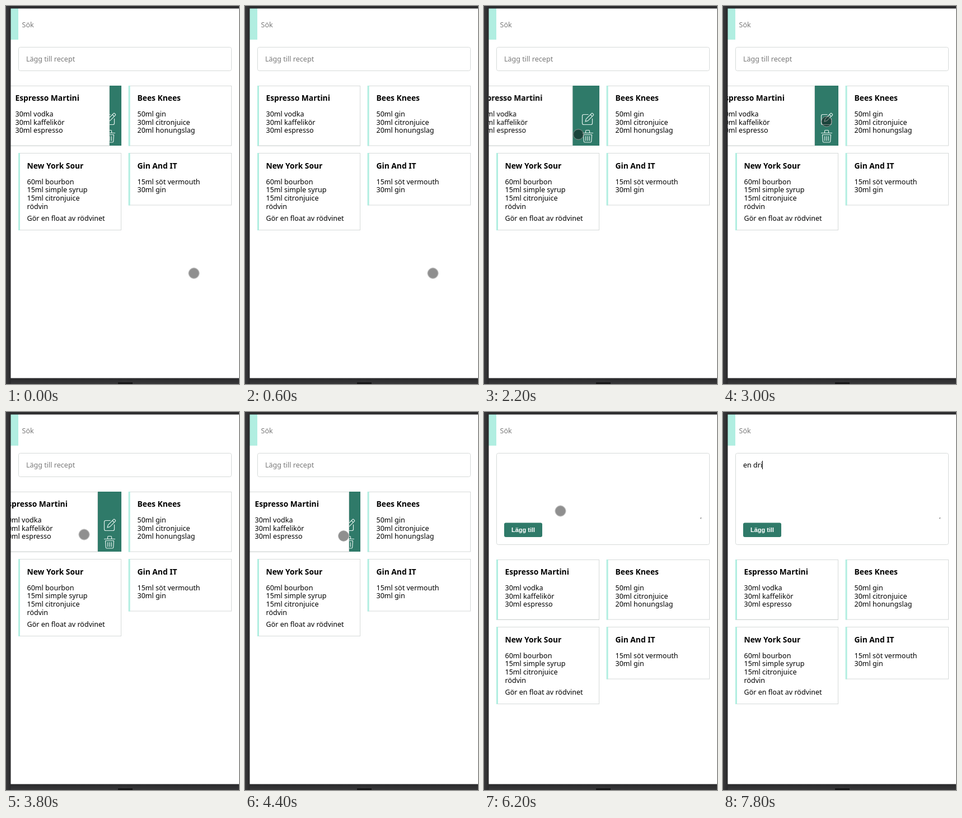
Animation of 416x674 px, one loop 8000 ms. Source, as an HTML page:

```html
<!DOCTYPE html>
<html lang="sv">
<head>
<meta charset="utf-8">
<title>Recept</title>
<style>
html, body { margin: 0; width: 100%; height: 100%; overflow: hidden; background: #fff; }
svg { display: block; width: 416px; height: 674px; font: 500 12.55px "Noto Sans", "Open Sans", sans-serif; fill: #000; }
.title { font-size: 13.8px; font-weight: 700; }
.hint { fill: #7a7a7a; }
.box { fill: #fff; stroke: #d6dad9; }
.accent { fill: #b1eee1; }
.green { fill: #2f7a69; }
.icon { fill: none; stroke: #e4f1ed; stroke-width: 1.2; stroke-linecap: round; stroke-linejoin: round; }
.button { font: 700 11px "Liberation Sans", Arial, sans-serif; fill: #fff; }

.anim { animation: 8s step-end infinite; }
.swipe { animation-name: swipe; }
.cursor { animation-name: cursor; }
.cards { animation-name: push; }
.closed { animation-name: hide; }
.open { animation-name: show; }
.caret { animation-name: caret; }
.k1 { animation-name: type1; }
.k2 { animation-name: type2; }
.k3 { animation-name: type3; }
.k4 { animation-name: type4; }

@keyframes swipe {
  0% { transform: translateX(-21px); }
  2.5% { transform: translateX(-9px); }
  5% { transform: translateX(-2px); }
  7.5%, 22.5% { transform: none; }
  25% { transform: translateX(-24px); }
  27.5% { transform: translateX(-47.5px); }
  30% { transform: translateX(-42px); }
  52.5% { transform: translateX(-38px); }
  55% { transform: translateX(-20px); }
  57.5% { transform: translateX(-4px); }
  60%, 100% { transform: none; }
}
@keyframes cursor {
  0% { transform: translate(335.5px, 476.5px); }
  17.5% { transform: translate(207.5px, 290.5px); }
  20% { transform: translate(202px, 258px); }
  22.5% { transform: translate(199px, 233px); }
  25% { transform: translate(186px, 230px); }
  27.5% { transform: translate(168.5px, 229px); }
  30% { transform: translate(170px, 229px); }
  32.5% { transform: translate(182px, 230px); }
  35% { transform: translate(185px, 224px); }
  37.5% { transform: translate(185px, 206px); }
  40% { transform: translate(180px, 208px); }
  42.5% { transform: translate(158px, 214px); }
  45% { transform: translate(139.5px, 218.5px); }
  52.5% { transform: translate(147px, 219px); }
  55% { transform: translate(176px, 221px); }
  57.5% { transform: translate(204px, 220px); }
  60% { transform: translate(198px, 200px); }
  62.5% { transform: translate(170px, 152px); }
  65% { transform: translate(146px, 112px); }
  67.5% { transform: translate(136.5px, 101.5px); }
  72.5% { transform: translate(136.5px, 118px); }
  75% { transform: translate(136.5px, 156px); }
  77.5% { transform: translate(136.5px, 176.5px); opacity: 1; }
  90%, 100% { transform: translate(136.5px, 176.5px); opacity: 0; }
}
@keyframes push { 0% { transform: none; } 70%, 100% { transform: translateY(121px); } }
@keyframes hide { 0% { opacity: 1; } 70%, 100% { opacity: 0; } }
@keyframes show { 0% { opacity: 0; } 70%, 100% { opacity: 1; } }
@keyframes caret {
  0% { opacity: 0; transform: none; }
  70% { opacity: 1; transform: none; }
  77.5% { opacity: 0; transform: none; }
  82.5% { opacity: 1; transform: none; }
  90% { opacity: 1; transform: translateX(7px); }
  92.5% { opacity: 1; transform: translateX(15px); }
  95% { opacity: 1; transform: translateX(26px); }
  97.5%, 100% { opacity: 1; transform: translateX(34px); }
}
@keyframes type1 { 0% { fill-opacity: 0; } 90%, 100% { fill-opacity: 1; } }
@keyframes type2 { 0% { fill-opacity: 0; } 92.5%, 100% { fill-opacity: 1; } }
@keyframes type3 { 0% { fill-opacity: 0; } 95%, 100% { fill-opacity: 1; } }
@keyframes type4 { 0% { fill-opacity: 0; } 97.5%, 100% { fill-opacity: 1; } }
</style>
</head>
<body>
<svg viewBox="0 0 416 674">
  <defs>
    <linearGradient id="side"><stop stop-color="#39393b"/><stop offset="1" stop-color="#29292b"/></linearGradient>
    <linearGradient id="base" x2="0" y2="1"><stop stop-color="#29292b"/><stop offset="1" stop-color="#39393b"/></linearGradient>
  </defs>
  <rect width="416" height="674" fill="#fff"/>

  <rect class="accent" x="8" y="4" width="14" height="56"/>
  <text class="hint" x="28.5" y="38">Sök</text>

  <g class="anim closed">
    <rect class="box" x="22.5" y="73.5" width="380" height="42" rx="3"/>
    <text class="hint" x="36" y="99">Lägg till recept</text>
  </g>

  <g class="anim cards">
    <rect class="green" x="23" y="142" width="183" height="107"/>
    <g class="icon">
      <path d="M186 193.5H178a2.5 2.5 0 0 0-2.5 2.5V209a2.5 2.5 0 0 0 2.5 2.5H191a2.5 2.5 0 0 0 2.5-2.5V201"/>
      <path d="M181 206l1.3-4.6 9.7-9.7q1-1 2 0l1.2 1.2q1 1 0 2l-9.7 9.7zM190 193.7l3.2 3.2"/>
      <path d="M175.5 226.5h19M181.5 226v-3q0-1.5 1.5-1.5h4q1.5 0 1.5 1.5v3M177.5 229.5l.8 12q.1 1.5 1.7 1.5h10q1.6 0 1.7-1.5l.8-12zM181.7 232.5v7.5M185 232.5v7.5M188.3 232.5v7.5"/>
    </g>
    <g class="anim swipe">
      <rect class="box" x="22.5" y="142.5" width="183" height="106.5"/>
      <path d="M22 249.5h184" stroke="#d6dad9"/>
      <rect class="accent" x="22" y="142" width="3" height="107.5"/>
      <text class="title" x="37.5" y="169">Espresso Martini</text>
      <text y="196.8"><tspan x="37.5">30ml vodka</tspan><tspan x="37.5" dy="14.8">30ml kaffelikör</tspan><tspan x="37.5" dy="14.8">30ml espresso</tspan></text>
    </g>

    <rect class="box" x="219.5" y="142.5" width="183" height="106.5"/>
    <rect class="accent" x="218.6" y="142" width="3" height="107.5"/>
    <text class="title" x="234.5" y="169">Bees Knees</text>
    <text y="196.8"><tspan x="234.5">50ml gin</tspan><tspan x="234.5" dy="14.8">30ml citronjuice</tspan><tspan x="234.5" dy="14.8">20ml honungslag</tspan></text>

    <rect class="box" x="22.5" y="262.5" width="183" height="137"/>
    <rect class="accent" x="22" y="262" width="3" height="138"/>
    <text class="title" x="37.5" y="290">New York Sour</text>
    <text y="317.5"><tspan x="37.5">60ml bourbon</tspan><tspan x="37.5" dy="14.8">15ml simple syrup</tspan><tspan x="37.5" dy="14.8">15ml citronjuice</tspan><tspan x="37.5" dy="14.8">rödvin</tspan><tspan x="37.5" dy="21">Gör en float av rödvinet</tspan></text>

    <rect class="box" x="219.5" y="262.5" width="183" height="92.5"/>
    <rect class="accent" x="218.6" y="262" width="3" height="93.5"/>
    <text class="title" x="234.5" y="290">Gin And IT</text>
    <text y="317.5"><tspan x="234.5">15ml söt vermouth</tspan><tspan x="234.5" dy="14.8">30ml gin</tspan></text>
  </g>

  <g class="anim open">
    <rect class="box" x="22.5" y="73.5" width="380" height="163" rx="3"/>
    <path d="M386 190l2-2M387.5 190.5l.8-.8" stroke="#555"/>
    <rect class="green" x="36" y="197.5" width="68" height="25.5" rx="3"/>
    <text class="button" x="49" y="214.3">Lägg till</text>
    <text x="36" y="99"><tspan class="anim k1">e</tspan><tspan class="anim k2">n</tspan><tspan class="anim k3"> d</tspan><tspan class="anim k4">ri</tspan></text>
    <rect class="anim caret" x="36" y="87" width="1" height="15"/>
  </g>

  <g class="anim cursor">
    <circle r="9" fill="#000" fill-opacity=".44"/>
    <circle r="9.2" fill="none" stroke="#8f8f8f"/>
  </g>

  <rect width="416" height="4.5" fill="#2d2d2f"/>
  <rect y="663.5" width="416" height="10.5" fill="url(#base)"/>
  <rect width="8.5" height="674" fill="url(#side)"/>
  <rect x="200" y="671" width="26" height="3" fill="#151516"/>
</svg>
</body>
</html>
```
